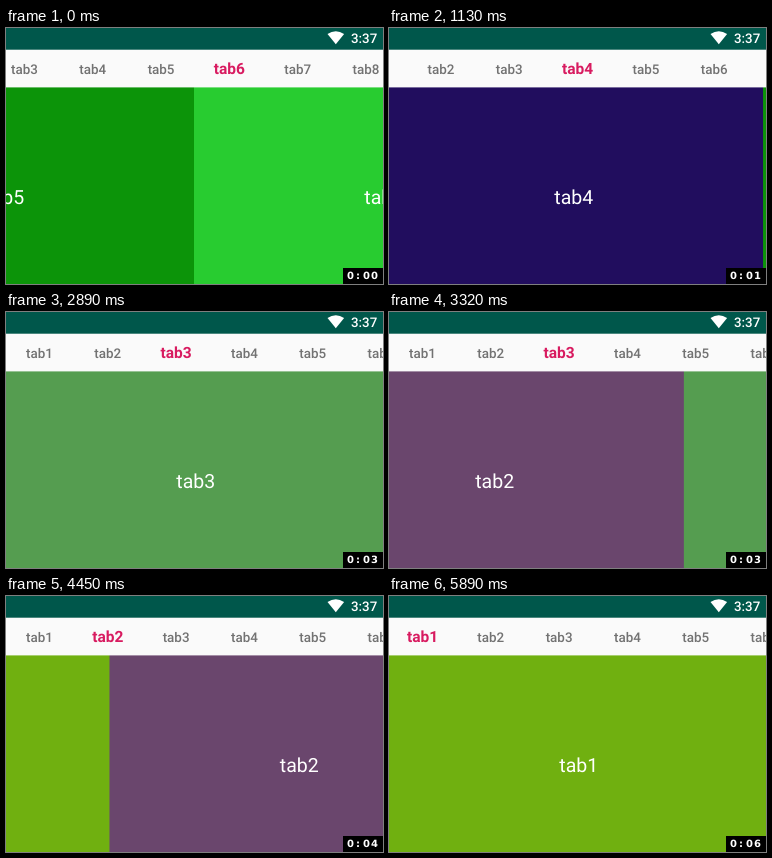
An HTML page for the animation above (5.99 s loop, 377 px wide and 256 px high).

```html
<!DOCTYPE html>
<html lang="en">
<head>
<meta charset="utf-8">
<title>Swipe tabs</title>
<style>
  html, body { margin: 0; width: 100%; height: 100%; overflow: hidden; background: #fafafa; }
  svg { display: block; width: 377px; height: 256px; font-family: Roboto, sans-serif; text-rendering: geometricPrecision; }
  .page { font-size: 19.5px; fill: #fff; text-anchor: middle; }
  .tab { font-size: 13.4px; font-weight: 500; fill: #727272; text-anchor: middle; }
  .tab.on { font-size: 15.5px; font-weight: 700; fill: #d81b60; }
  .clock { font-size: 13.3px; font-weight: 500; fill: #fff; }
  .timer { font: bold 10px "DejaVu Sans", sans-serif; fill: #fff; }
</style>
</head>
<body>
<svg viewBox="0 0 377 256">
  <g id="pages"></g>
  <rect width="377" height="59.4" fill="#fafafa"/>
  <g id="tabs"></g>
  <rect width="377" height="21.7" fill="#00574b"/>
  <path d="M329.8 16.3L321.5 6Q329.8 0.4 338.1 6Z" fill="#fff"/>
  <text class="clock" x="345" y="15.3">3:37</text>
  <rect x="337" y="240" width="40" height="16"/>
  <text class="timer" id="timer" x="341 350 357 365" y="251"></text>
</svg>
<script>
const LOOP = 5990, PAGE_W = 379, TAB_W = 68.3, TAB_COUNT = 8;
const COLORS = ['#70b010', '#6a466d', '#559d50', '#210d5e', '#0c9409', '#28cc30'];

// The screen refreshes in coarse ticks, about seven per second
const TICK = 138.5, LEAD = 20, TICKS_PER_SECOND = 7;

// Each swipe goes one page back. In ticks: at = start, hold = finger still,
// settle = glide time, pick = delay of the highlight; left = distance to go.
const SWIPES = [
  { at: 0, left: 0.504, hold: 0, settle: 4, power: 5, pick: 1 },
  { at: 7, left: 0.42, hold: 0, settle: 2, power: 5, pick: 1 },
  { at: 15, left: 0.55, hold: 0, settle: 1, power: 5, pick: 3 },
  { at: 23, left: 0.222, hold: 1, settle: 4, power: 2.2, pick: 3 },
  { at: 32, left: 0.727, hold: 0, settle: 5, power: 3, pick: 2 }
];

const byId = id => document.getElementById(id);
const clamp = x => Math.min(1, Math.max(0, x));
const timer = byId('timer');

function add(parent, tag, attrs, text = '') {
  const el = document.createElementNS('http://www.w3.org/2000/svg', tag);
  for (const key in attrs) el.setAttribute(key, attrs[key]);
  el.textContent = text;
  return parent.appendChild(el);
}

const pages = COLORS.map((fill, i) => {
  const g = add(byId('pages'), 'g', {});
  add(g, 'rect', { y: 59, width: PAGE_W + 1, height: 197, fill });
  add(g, 'text', { class: 'page', x: PAGE_W / 2 + 0.3, y: 176 }, 'tab' + (i + 1));
  return g;
});

const tabs = Array.from({ length: TAB_COUNT }, (_, i) =>
  add(byId('tabs'), 'text', { y: 46 }, 'tab' + (i + 1)));

function pagerAt(tick) {
  let pos = COLORS.length - 1, selected = pos;
  SWIPES.forEach((s, i) => {
    if (tick < s.at) return;
    const target = COLORS.length - 2 - i;
    const glide = clamp((tick - s.at - s.hold) / s.settle);
    pos = target + s.left * (1 - glide) ** s.power;
    if (tick >= s.at + s.pick) selected = target;
  });
  return { pos, selected };
}

function draw(t) {
  const tick = Math.floor((t + LEAD) / TICK);
  const { pos, selected } = pagerAt(tick);
  const scroll = Math.max(0, pos * TAB_W - 156);
  pages.forEach((g, i) =>
    g.setAttribute('transform', `translate(${(i - pos) * PAGE_W})`));
  tabs.forEach((tab, i) => {
    tab.setAttribute('x', 33.5 + i * TAB_W - scroll);
    tab.setAttribute('class', i === selected ? 'tab on' : 'tab');
  });
  timer.textContent = '0:0' + Math.floor(tick / TICKS_PER_SECOND);
}

const start = performance.now();
function frame() {
  draw((performance.now() - start) % LOOP);
  requestAnimationFrame(frame);
}
frame();
</script>
</body>
</html>
```
